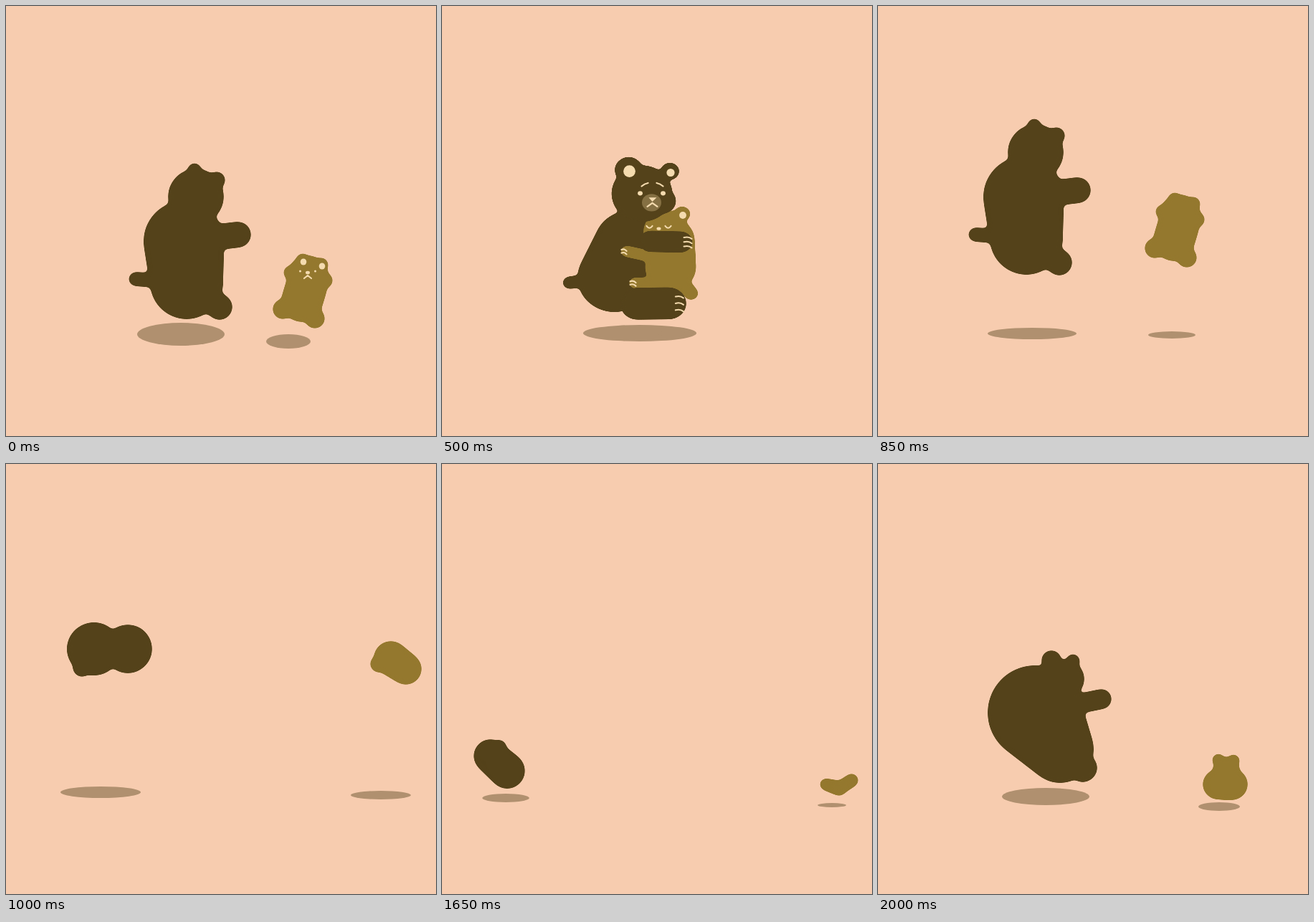
Recreate the animation shown at these times as an HTML page. Size 600 by 600 pixels, loop 2.05 s.

```html
<!DOCTYPE html>
<html lang="en">
<head>
<meta charset="utf-8">
<title>Bear hug</title>
<style>
html, body { margin: 0; width: 100%; height: 100%; overflow: hidden; background: #f7ccaf; }
svg { display: block; width: 100%; height: 100%; }
</style>
</head>
<body>
<svg viewBox="0 0 600 600">
  <filter id="goo" filterUnits="userSpaceOnUse" x="-50" y="0" width="700" height="600" color-interpolation-filters="sRGB">
    <feGaussianBlur stdDeviation="3"/>
    <feColorMatrix values="1 0 0 0 0  0 1 0 0 0  0 0 1 0 0  0 0 0 12 -5.5"/>
  </filter>
  <g id="scene"></g>
</svg>
<script>
const LOOP = 2050, STEP = 50, HUG_START = 100, HUG_END = 700, EYES_OPEN = 500;
const DARK = '#54421a', OLIVE = '#94782e', CREAM = '#f4dbaf', MUZZLE = '#857043', SHADE = '#b0906f';
const scene = document.getElementById('scene');

// A pose places a bear's joints as circles [x, y, r]; shade is an ellipse [x, y, rx, ry].
// Joints left out stay tucked inside the chest (or the hip, for the thigh).
const JOINTS = ['head', 'cheek', 'earL', 'earR', 'nose', 'chest', 'hip', 'shoulder', 'hand', 'thigh', 'foot', 'tail', 'shade'];

const big = {
  run: {
    head: [265, 266, 39], earL: [263, 229, 10], earR: [294, 243, 12], chest: [248, 328, 56], hip: [252, 386, 51],
    hand: [324, 319, 18], foot: [298, 420, 18], tail: [181, 381, 10], shade: [244, 458, 61, 16]
  },
  land: {
    head: [277, 251, 42], cheek: [304, 266, 18], earL: [262, 215, 20], earR: [321, 228, 12], nose: [293, 257, 14.5],
    chest: [264, 325, 51], hip: [243, 378, 54], shoulder: [292, 319, 19], hand: [335, 321, 19],
    thigh: [278, 420, 28], foot: [319, 418, 28], tail: [180, 382, 9], shade: [276, 459, 76, 16]
  },
  jump: {
    head: [281, 245, 43], cheek: [310, 252, 21], earL: [259, 210, 19], earR: [315, 201, 14], nose: [294, 257, 12.5],
    chest: [262, 322, 50], hip: [238, 370, 49], shoulder: [290, 320, 13], hand: [332, 320, 13],
    thigh: [267, 406, 20], foot: [315, 407, 20], tail: [176, 381, 10], shade: [276, 454, 82, 7]
  },
  blob: { head: [170, 258, 34], chest: [123, 258, 37], hip: [121, 258, 36], foot: [106, 284, 13], shade: [132, 458, 56, 8] },
  bean: { chest: [22, 407, 15], hip: [46, 434, 18], shade: [42, 467, 27, 4] },
  bud: {
    head: [174, 342, 21], chest: [125, 389, 49], hip: [149, 393, 47], hand: [193, 379, 16], foot: [180, 423, 16],
    shade: [153, 464, 52, 10]
  },
  leap: {
    head: [261, 300, 27], earL: [242, 274, 14], earR: [272, 275, 10], chest: [219, 347, 66], hip: [254, 398, 47],
    hand: [312, 328, 14], foot: [286, 424, 20], shade: [234, 464, 61, 12]
  }
};

const cub = {
  run: {
    head: [421, 377, 29], cheek: [445, 383, 11], earL: [414, 355, 10], earR: [440, 361, 10], nose: [421, 372, 10.5],
    chest: [419, 392, 29], hip: [413, 412, 29], hand: [397, 372, 10], foot: [386, 423, 14], tail: [431, 436, 14],
    shade: [394, 468, 31, 10]
  },
  land: {
    head: [320, 307, 32], earR: [342, 280, 11], nose: [308, 299, 11], chest: [322, 320, 32], hip: [321, 362, 36],
    shoulder: [300, 347, 8], hand: [254, 329, 8], thigh: [315, 384, 9], foot: [268, 384, 9], tail: [353, 394, 10],
    shade: [320, 460, 20, 5]
  },
  jump: {
    head: [306, 303, 32], earR: [328, 277, 12], nose: [297, 302, 15], chest: [318, 314, 33], hip: [317, 355, 35],
    shoulder: [300, 342, 9], hand: [262, 340, 9], thigh: [310, 381, 8], foot: [271, 380, 8], tail: [342, 401, 10],
    shade: [320, 454, 20, 3]
  },
  blob: { chest: [537, 271, 24], hip: [558, 286, 22], hand: [520, 279, 12], shade: [523, 462, 42, 6] },
  bean: { chest: [493, 462, 9], hip: [513, 468, 11], foot: [531, 456, 10], shade: [502, 476, 21, 3] },
  edge: { chest: [603, 382, 19], hip: [606, 382, 19], shade: [612, 476, 30, 4] },
  leap: { head: [486, 428, 19], earL: [475, 413, 9], earR: [496, 414, 9], chest: [474, 447, 21], hip: [494, 447, 22], shade: [476, 478, 29, 6] }
};

const mix = (a, b, u) => a + (b - a) * u;
const mixAll = (a, b, u) => a.map((v, i) => mix(v, b[i], u));

function joint(pose, name) {
  if (pose[name]) return pose[name];
  const [x, y, r] = name === 'thigh' ? pose.hip : pose.chest;
  return [x, y, r / 2];
}

const blend = (a, b, u) =>
  Object.fromEntries(JOINTS.map(name => [name, mixAll(joint(a, name), joint(b, name), u)]));

// Moves a pose and scales it about its chest; the shadow stays on the ground.
function move(pose, dx, dy, s = 1) {
  const [cx, cy] = pose.chest;
  return Object.fromEntries(Object.entries(pose).map(([name, [x, y, r, ry]]) => {
    const mx = cx + (x - cx) * s + dx;
    return [name, name === 'shade' ? [mx, y, r * s, ry] : [mx, cy + (y - cy) * s + dy, r * s]];
  }));
}

function timeline(bear, apart) {
  const settle = blend(bear.land, bear.jump, .6);
  return [[0, bear.run], [HUG_START, bear.land], [250, bear.land], [550, settle], [600, settle],
    [HUG_END, bear.jump], ...apart, [2000, bear.leap], [LOOP, bear.run]];
}
const bigRest = move(big.blob, -85, 33, .72), cubRest = move(cub.blob, 52, 28, .85);
const bigKeys = timeline(big, [
  [850, { ...move(big.run, -45, -62), shade: [215, 457, 62, 8] }],
  [1000, big.blob], [1150, bigRest], [1200, bigRest], [1400, big.bean],
  [1500, move(big.bean, -10, 9, .9)], [1600, move(big.bean, 22, 2, 1.1)],
  [1750, move(big.bud, -11, 15, .75)], [1850, big.bud]]);
const cubKeys = timeline(cub, [
  [850, { ...move(cub.run, 0, -85), shade: [410, 459, 33, 5] }],
  [1000, cub.blob], [1150, cubRest], [1200, cubRest], [1400, cub.edge],
  [1550, move(cub.bean, 84, -22, .9)], [1750, move(cub.bean, 1, -8)], [1850, cub.bean]]);

function poseAt(keys, t) {
  const i = keys.findIndex(key => key[0] > t), [t0, a] = keys[i - 1], [t1, b] = keys[i];
  return blend(a, b, (t - t0) / (t1 - t0));
}

// Drawing helpers
const ellipse = (x, y, rx, ry, fill) => `<ellipse cx="${x}" cy="${y}" rx="${rx}" ry="${ry}" fill="${fill}"/>`;
const disc = ([x, y, r], fill = 'inherit') => ellipse(x, y, r, r, fill);
const stroke = (d, color, width) =>
  `<path d="${d}" fill="none" stroke="${color}" stroke-width="${width}" stroke-linecap="round" stroke-linejoin="round"/>`;
const mark = d => stroke(d, CREAM, 2.2);
const limb = ([x, y], [ex, ey, r], color) => stroke(`M${x} ${y}L${ex} ${ey}`, color, 2 * r);
const goo = (color, shapes) => `<g filter="url(#goo)" fill="${color}">${shapes}</g>`;

function anatomy(p, color) {
  let trunk = limb(p.hip, p.tail, color);
  for (let u = 0; u <= 1; u += 1 / 16) trunk += disc(mixAll(p.chest, p.hip, u));
  return {
    trunk,
    limbs: limb(p.shoulder, p.hand, color) + limb(p.thigh, p.foot, color),
    head: [p.head, p.cheek, p.earL, p.earR].map(j => disc(j)).join('')
  };
}

const innerEar = ([x, y, r]) => ellipse(x + 1, y + 2, r * .43, r * .46, CREAM);
const chevron = (x, y, w, h) => mark(`M${x - w} ${y + h}L${x} ${y}L${x + w} ${y + h}`);
const lid = (x, y, w) => mark(`M${x - w} ${y - 1}Q${x} ${y + 5} ${x + w} ${y - 1}`);
const sides = draw => draw(-1) + draw(1);

// Short curved claws, count of them stacked across a paw
function claws([x, y, r], count, offset, gap, length) {
  let out = '';
  for (let k = 0; k < count; k++) {
    const top = y + (k - (count - 1) / 2) * gap;
    out += mark(`M${x + offset - length / 2} ${top}q${length * .6} -2 ${length} 2`);
  }
  return out;
}

function bigFace(p, awake) {
  const [x, y, r] = p.nose;
  return innerEar(p.earL) + innerEar(p.earR)
    + ellipse(x - 1, y + r - 9, r, r * .96, MUZZLE)
    + `<path d="M${x - 5} ${y - 3}h11l-6 6z" fill="${CREAM}"/>` + chevron(x, y + 5, 7, r * .4)
    + sides(s => {
      const ex = x - 1 + s * 16, ey = y - 9.5;
      return mark(`M${x + s * 6} ${y - 25}Q${x + s * 11} ${y - 24} ${x + s * 15} ${y - 20}`)
        + (awake ? disc([ex, ey, 3.4], CREAM) : lid(ex, ey, 6));
    });
}

function cubFace(p, awake) {
  const [x, y, spread] = p.nose;
  return innerEar(p.earR) + (awake ? innerEar(p.earL) + chevron(x, y + 4, 5, 4) : '')
    + ellipse(x, y, 3, 2.3, CREAM)
    + sides(s => awake ? disc([x + s * spread, y - 2, 1.5], CREAM) : lid(x + s * spread, y - 3, 4));
}

function bears(t, b, c) {
  const { trunk, limbs, head } = anatomy(b, DARK), young = anatomy(c, OLIVE);
  const cubBody = goo(OLIVE, young.trunk + young.limbs + young.head);
  if (t < HUG_START || t > HUG_END)
    return goo(DARK, trunk + limbs + head) + cubBody + (t < HUG_START ? cubFace(c, true) : '');
  return goo(DARK, trunk + head) + cubBody + cubFace(c, false)
    + claws(c.hand, 2, -4, 5, 7) + claws(c.foot, 2, -3, 5, 8)
    + goo(DARK, limbs) + goo(DARK, head) + bigFace(b, t >= EYES_OPEN)
    + [b.hand, b.foot].map(j => claws(j, 3, j[2] * .6, j[2] * .42, 11)).join('');
}

function render(t) {
  const b = poseAt(bigKeys, t), c = poseAt(cubKeys, t);
  const crouch = t > 250 && t < HUG_END ? 1 - .07 * Math.sin(Math.PI * (t - 250) / (HUG_END - 250)) : 1;
  scene.innerHTML = ellipse(...b.shade, SHADE) + ellipse(...c.shade, SHADE)
    + `<g transform="translate(0 ${448 * (1 - crouch)}) scale(1 ${crouch})">${bears(t, b, c)}</g>`;
}

const start = performance.now();
let shown = -1;
function tick() {
  const t = Math.floor((performance.now() - start) % LOOP / STEP) * STEP;
  if (t !== shown) render(shown = t);
  requestAnimationFrame(tick);
}
tick();
</script>
</body>
</html>
```
